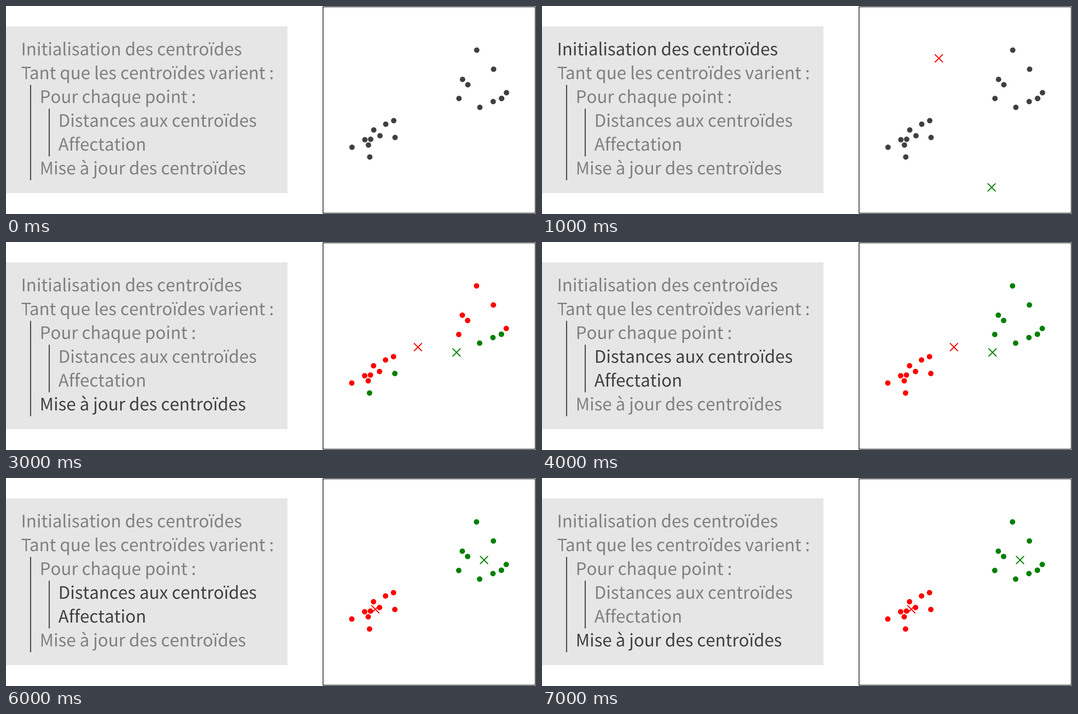
A matplotlib script that plays this animation: 1194 by 469 pixels, repeating every 8 s.

```python
import numpy as np
import matplotlib.pyplot as plt
from matplotlib.animation import FuncAnimation
from matplotlib.patches import PathPatch, Rectangle
from matplotlib.textpath import TextPath
from matplotlib.transforms import Affine2D

W, H, DPI = 1194, 469, 100
PX = 72 / DPI  # points per pixel
GRAY, DARK = "#808080", "#404040"
COLORS = np.array(["#ff0000", "#008000"])
LEFT, INDENT, BASELINE, PITCH = 34, 42, 111.2, 53.7

plt.rcParams.update({"font.family": "Noto Sans CJK JP", "toolbar": "None"})

# Two clusters of ten samples; one sample in the upper cluster occurs twice.
UPPER = [(1060, 99), (1098, 142), (1028, 165), (1040, 177), (1020, 208.5),
         (1127, 195), (1116, 208), (1116, 208), (1097, 215.5), (1067, 228)]
LOWER = [(873, 258.5), (855, 266), (828, 279), (841.5, 292), (808, 301.5),
         (821, 300), (816, 313), (876, 296.5), (779, 318), (819, 340.5)]
POINTS = np.array(UPPER + LOWER)
START = np.array([(893.5, 118.2), (1013, 408.8)])
AXIS_WEIGHTS = np.array([1, 1.08])  # the two plot axes differ in scale

# row, indent level, text ("Ta" is a kerned pair)
LINES = [
    (0, 0, "Initialisation des centroïdes"),
    (1, 0, "T"),
    (1, 0.45, "ant que les centroïdes varient :"),
    (2, 1, "Pour chaque point :"),
    (3, 2, "Distances aux centroïdes"),
    (4, 2, "Affectation"),
    (5, 1, "Mise à jour des centroïdes"),
]
INIT, ASSIGN, UPDATE = (0,), (3, 4), (5,)


def nearest(centers):
    gaps = POINTS[:, None] - centers
    return np.argmin((gaps ** 2 * AXIS_WEIGHTS).sum(axis=2), axis=1)


def kmeans_steps(rounds=3):
    """List of (highlighted rows, labels, centers), one per second."""
    centers = START
    steps = [((), None, None), (INIT, None, centers)]
    for _ in range(rounds):
        labels = nearest(centers)
        steps.append((ASSIGN, labels, centers))
        centers = np.array([POINTS[labels == k].mean(axis=0) for k in (0, 1)])
        steps.append((UPDATE, labels, centers))
    return steps


def baseline(row):
    return BASELINE + PITCH * row


def add_text(row, level, text):
    place = Affine2D().scale(1, -1).translate(LEFT + INDENT * level,
                                              baseline(row))
    path = TextPath((0, 0), text, size=38.55).transformed(place)
    return ax.add_patch(PathPatch(path, fc=GRAY, lw=0))


def add_block_bar(level, first, last):
    x = LEFT + INDENT * (level + 0.51)
    ax.plot([x, x], [baseline(first) - 40.7, baseline(last) + PITCH - 40.7],
            color="black", lw=1.7 * PX, solid_capstyle="butt", snap=False)


STEPS = kmeans_steps()

fig = plt.figure(figsize=(W / DPI, H / DPI), dpi=DPI, facecolor="white")
ax = fig.add_axes([0, 0, 1, 1])
ax.axis("off")

ax.add_patch(Rectangle((0, 46), 634.3, 376.5, fc="#e6e6e6", ec="none"))
ax.add_patch(Rectangle((714.3, 1.7), 478.2, 465.6, fill=False, ec="black",
                       lw=1.5 * PX, snap=False))
add_block_bar(0, 2, 5)
add_block_bar(1, 3, 4)
texts = [(row, add_text(row, level, text)) for row, level, text in LINES]
dots = ax.scatter(*POINTS.T, s=(12.2 * PX) ** 2, c=DARK, linewidths=0,
                  zorder=3)
crosses = [
    ax.plot([], [], "x", color=color, ms=17.6 * PX, mew=2.3 * PX, zorder=4)[0]
    for color in COLORS
]
ax.set(xlim=(0, W), ylim=(H, 0))


def draw(frame):
    rows, labels, centers = STEPS[frame]
    for row, text in texts:
        text.set_facecolor(DARK if row in rows else GRAY)
    dots.set_facecolor(DARK if labels is None else COLORS[labels])
    for k, cross in enumerate(crosses):
        cross.set_visible(centers is not None)
        if centers is not None:
            cross.set_data(*centers[k][:, None])
    return [dots, *crosses, *(text for _, text in texts)]


anim = FuncAnimation(fig, draw, frames=len(STEPS), interval=1000,
                     init_func=lambda: draw(0), repeat=True, repeat_delay=0,
                     blit=False)
plt.show()
```
